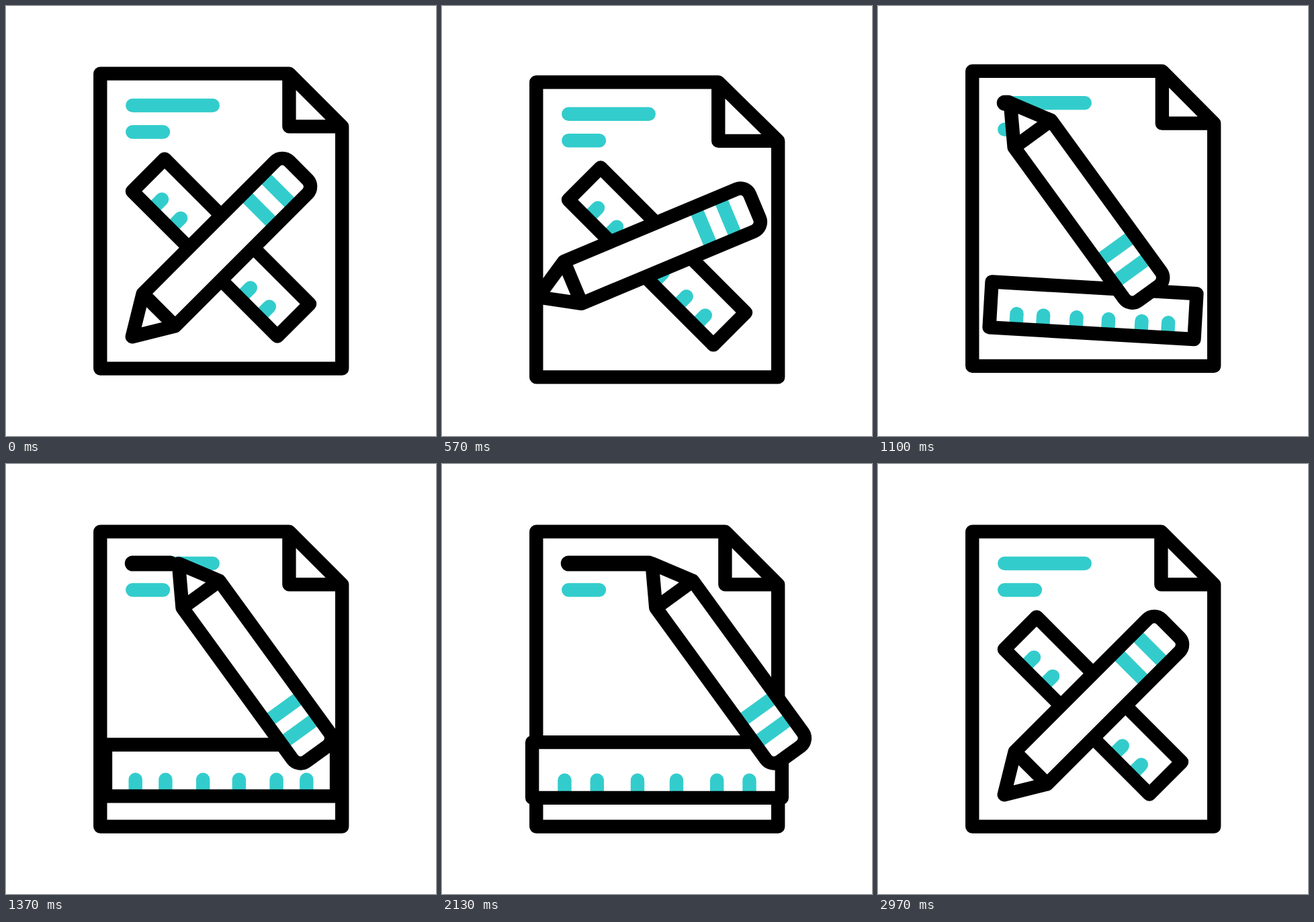
Write an HTML page that moves like this. It is 640 px wide and 640 px high and loops after 3.6 s.

```html
<!DOCTYPE html>
<html lang="en">
<head>
<meta charset="utf-8">
<title>Pencil and ruler</title>
<style>
  html, body { margin: 0; width: 100%; height: 100%; overflow: hidden; background: #fff; }
  svg { display: block; width: 100vw; height: 100vh; }
  path { fill: none; stroke-linejoin: round; stroke-linecap: round; }
  .ink { stroke: #000; stroke-width: 20.4; }
  .teal { stroke: #3cc; stroke-width: 20.4; }
  .band { stroke-linecap: butt; }
  .written { stroke: #000; stroke-width: 23; }
  .paper { fill: #fff; }
</style>
</head>
<body>
<svg viewBox="0 0 640 640">
  <g id="page">
    <path id="sheet" class="ink"/>
    <path class="teal" d="M188.3 148H307.8M188.3 187.5H234"/>
    <path id="written" class="written"/>
  </g>
  <g id="ruler">
    <path id="rulerFill" class="paper"/>
    <path id="marks" class="teal"/>
    <path id="rulerEdge" class="ink"/>
  </g>
  <g id="pencil">
    <path id="pencilFill" class="paper"/>
    <path class="teal band" d="M80.5 -34V34M120 -34V34"/>
    <path id="pencilEdge" class="ink"/>
  </g>
</svg>
<script>
const FPS = 30, LOOP = 3600, LAST = 89;
const LEFT = 140.3, RIGHT = 500.2, TOP = 100.6, BOTTOM = 539.6, FOLD = 78.8;
const LINE_START = 188.3, LINE_LENGTH = 119.7;
const set = (id, name, value) => document.getElementById(id).setAttribute(name, value);

// Eased progress from 0 to 1 between two animation steps.
const ease = (f, a, b) => {
  const t = Math.min(1, Math.max(0, (f - a) / (b - a)));
  return t * t * (3 - 2 * t);
};

// Goes from 0 to 1 between a and b, then back to 0 between c and d.
const trip = (f, a, b, c, d) => ease(f, a, b) - ease(f, c, d);

// The page's bounce: out to one extreme, over to the other, back to rest.
const swing = (f, first, second) =>
  first * trip(f, 0, 12, 12, 24) + second * trip(f, 12, 24, 24, 36);

const place = (id, x, y, angle = 0) =>
  set(id, 'transform', `translate(${x} ${y}) rotate(${angle})`);

const body = 'M-187 0L-130.5 -34H148a15 15 0 0 1 15 15V19a15 15 0 0 1 -15 15H-130.5Z';
set('pencilFill', 'd', body);
set('pencilEdge', 'd', body + 'M-130.5 -34V34');

function drawPage(f, lift) {
  const x = RIGHT - FOLD - swing(f, 22, -9.5);
  const y = TOP + FOLD + swing(f, 17.7, -6.3);
  set('sheet', 'd',
    `M${LEFT} ${TOP}H${x}L${RIGHT} ${y}V${BOTTOM}H${LEFT}ZM${x} ${TOP}V${y}H${RIGHT}`);
  place('page', 0, lift);

  const from = LINE_START + LINE_LENGTH * ease(f, 65, 83);
  const to = LINE_START + LINE_LENGTH * ease(f, 30, 53);
  set('written', 'd', f > 30 && f < 83 ? `M${from} 148H${to}` : '');
}

function drawRuler(f, lift) {
  const grow = .434 * trip(f, 36, 50, 57, 71);
  const drop = trip(f, 18, 32.8, 68, 88);
  const flat = trip(f, 18, 36, 70, 86);
  const w = 152.7 * (1 + grow), h = 34 * (1 + grow);
  const box = `M${-w} ${-h}H${w}V${h}H${-w}Z`;
  const mark = x => `M${x * w} ${h - 22.6 - 16 * grow}V${h - 3}`;
  set('rulerFill', 'd', box);
  set('rulerEdge', 'd', box);
  set('marks', 'd', [.156, .48, .74].map(x => mark(-x) + mark(x)).join(''));
  place('ruler', 320, 359.6 + 97.4 * drop - 7 * grow + lift, 45 - 45 * flat);
}

function drawPencil(f, lift) {
  const turn = ease(f, 11.5, 29.4), unturn = ease(f, 68, 83.2);
  const rise = ease(f, 11.5, 31), back = ease(f, 70, 82.8);
  const write = ease(f, 29.5, 51);
  const x = 320 - 22 * turn + 124.5 * write - 102.5 * back;
  const y = 360 - 60.5 * (rise - back) + lift;
  place('pencil', x, y, 99 * (turn - unturn) - 45);
}

function draw(ms) {
  const f = Math.min(LAST, Math.floor((ms % LOOP + 4) * FPS / 1000));
  const lift = swing(f, 35, -24);
  drawPage(f, lift);
  drawRuler(f, lift);
  drawPencil(f, lift);
}

const start = performance.now();
function tick() {
  draw(performance.now() - start);
  requestAnimationFrame(tick);
}
tick();
</script>
</body>
</html>
```
